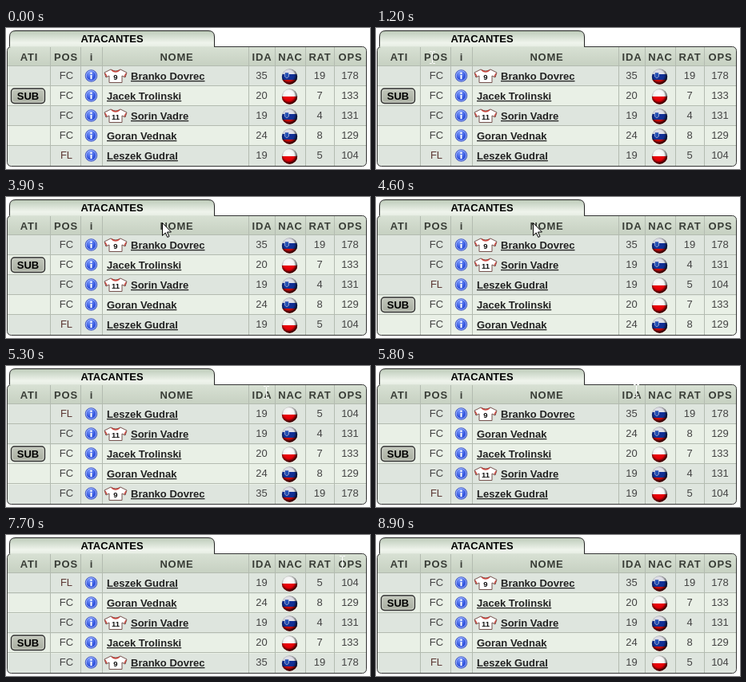
These frames come from a looping animation (455 by 177 pixels, 9900 ms). An HTML page:

```html
<!DOCTYPE html>
<html lang="pt">
<head>
<meta charset="utf-8">
<style>
html, body { margin: 0; width: 100%; height: 100%; overflow: hidden; background: #fff; }
svg { display: block; }
text { font: 13px "Liberation Sans", Arial, sans-serif; fill: #444; text-anchor: middle; }
.head { font-weight: bold; fill: #383c36; letter-spacing: .8px; }
.title { font-weight: bold; fill: #000; }
.name { font-weight: bold; fill: #222; text-anchor: start; text-decoration: underline; }
.small { font-size: 9.5px; font-weight: bold; fill: #111; }
.FL { fill: #5e3a36; }
.line { stroke: #b3bbb0; shape-rendering: crispEdges; }
</style>
</head>
<body>
<svg id="stage" width="455" height="177" viewBox="0 0 455 177">
  <defs>
    <linearGradient id="tab" x2="0" y2="1"><stop stop-color="#bccab8"/><stop offset=".75" stop-color="#eff4ec"/><stop offset="1" stop-color="#e6ede3"/></linearGradient>
    <linearGradient id="bar" x2="0" y2="1"><stop stop-color="#d8e1d4"/><stop offset="1" stop-color="#c6d0c1"/></linearGradient>
    <linearGradient id="button" x2="0" y2="1"><stop stop-color="#c3c8bc"/><stop offset="1" stop-color="#a8ada0"/></linearGradient>
    <radialGradient id="blue" cx=".4" cy=".25"><stop stop-color="#7c9bff"/><stop offset="1" stop-color="#3355dd"/></radialGradient>
    <radialGradient id="gloss" cx=".45" cy=".42" r=".58"><stop stop-color="#000" stop-opacity="0"/><stop offset=".6" stop-color="#000" stop-opacity=".05"/><stop offset="1" stop-color="#000" stop-opacity=".9"/></radialGradient>
    <clipPath id="ball"><circle r="9.7"/></clipPath>
    <clipPath id="panel"><rect x="1.5" y="23.5" width="449" height="150" rx="5"/></clipPath>
    <g id="info"><circle r="7.3" fill="url(#blue)" stroke="#3048b8" stroke-width=".8"/><circle r="6.3" fill="none" stroke="#b9c8ff" stroke-width=".8"/><path d="M0-1V4.2" stroke="#fff" stroke-width="2"/><circle cy="-3.3" r="1.2" fill="#fff"/></g>
    <g id="shirt"><path d="M-6-8 -14-4 -12 2 -8 0V8.5H8V0L12 2 14-4 6-8Q0-4-6-8Z" fill="#fff" stroke="#75524e"/><path d="M-13-3-11 1M13-3 11 1M-5-7Q0-3 5-7" fill="none" stroke="#c9433a" stroke-width="1.4"/></g>
    <g id="slovenia"><g clip-path="url(#ball)"><path d="M-10-10H10V-3H-10Z" fill="#e8e8f0"/><path d="M-10-3H10V4H-10Z" fill="#12319a"/><path d="M-10 4H10V10H-10Z" fill="#d80c10"/><path d="M-6-5H-1V0L-3.5 2 -6 0Z" fill="#2450b8" stroke="#d8d8e8" stroke-width=".6"/></g><circle r="9.7" fill="url(#gloss)"/></g>
    <g id="poland"><g clip-path="url(#ball)"><path d="M-10-10H10V0H-10Z" fill="#fff"/><path d="M-10 0H10V10H-10Z" fill="#f00008"/></g><circle r="9.7" fill="url(#gloss)"/></g>
  </defs>
  <g clip-path="url(#panel)"><g id="rows"></g></g>
  <g id="frame"></g>
  <path id="arrow" d="M.5.5V16.5L4.3 12.9 6.8 18.5 9 17.5 6.5 12H11.5Z" fill="#fff" stroke="#000"/>
  <path id="beam" d="M-3.5-7.5H-1L0-6.5 1-7.5H3.5M0-6.5V6.5M-3.5 7.5H-1L0 6.5 1 7.5H3.5" fill="none" stroke="#fff"/>
</svg>
<script>
const LOOP = 9900;
const $ = id => document.getElementById(id);
const label = (x, y, text, kind = '') => `<text x="${x}" y="${y}" class="${kind}">${text}</text>`;
const use = (id, x, y = 0) => `<use href="#${id}" x="${x}" y="${y}"/>`;

const columns = [['ATI', 29], ['POS', 75], ['i', 107], ['NOME', 213.5], ['IDA', 320], ['NAC', 355.5], ['RAT', 392.5], ['OPS', 430.5]];
const dividers = [55.5, 93.5, 120.5, 303.5, 336.5, 374.5, 410.5];
const players = [
  { name: 'Branko Dovrec', pos: 'FC', shirt: 9, age: 35, flag: 'slovenia', rating: 19, total: 178 },
  { name: 'Jacek Trolinski', pos: 'FC', sub: true, age: 20, flag: 'poland', rating: 7, total: 133 },
  { name: 'Sorin Vadre', pos: 'FC', shirt: 11, age: 19, flag: 'slovenia', rating: 4, total: 131 },
  { name: 'Goran Vednak', pos: 'FC', age: 24, flag: 'slovenia', rating: 8, total: 129 },
  { name: 'Leszek Gudral', pos: 'FL', age: 19, flag: 'poland', rating: 5, total: 104 }
];

// Player indices from the top row down, after each click on a header.
const orders = [
  [0, '01234'], [2400, '40123'], [3000, '01234'], [4000, '31420'], [4600, '02413'],
  [5200, '42130'], [5800, '03124'], [6400, '24130'], [7000, '03142'], [7700, '43210'], [8300, '01234']
];

// Pointer positions: time, x, y, shape.
const pointer = [
  [0, 0, 0, ''],
  [800, 20, 0, 'arrow'], [900, 60, 12, 'arrow'], [1000, 110, 22, 'arrow'], [1100, 132, 31, 'arrow'],
  [1200, 70.5, 37, 'beam'], [1400, 70.5, 36, 'beam'],
  [3100, 100, 8, 'arrow'], [3200, 145, 33, 'arrow'], [3400, 172, 34, 'arrow'], [3500, 183, 33, 'arrow'],
  [3600, 189, 33, 'arrow'], [3700, 192, 33, 'arrow'], [3800, 194, 32, 'arrow'], [3900, 195, 32, 'arrow'],
  [4300, 196, 32, 'arrow'], [4700, 200, 30, 'arrow'], [4800, 215, 29, 'arrow'],
  [5000, 322, 30, 'arrow'], [5200, 325.5, 33, 'beam'], [5500, 325.5, 31, 'beam'],
  [5900, 360, 31, 'beam'], [6000, 393.5, 32, 'beam'], [6200, 393.5, 31, 'beam'],
  [7200, 415.5, 33, 'beam'], [7300, 426.5, 34, 'beam'], [7500, 424.5, 34, 'beam'], [7600, 420.5, 34, 'beam'],
  [8400, 413, 35, 'arrow'], [8600, 300, 50, 'arrow'], [8700, 150, 64, 'arrow'], [8800, 19, 10, 'arrow'], [8900, 0, 0, '']
];

function drawFrame() {
  let out = '<path d="M4.5 23.5V11Q4.5 3.5 12 3.5H253Q260.5 3.5 260.5 11V23.5" fill="url(#tab)" stroke="#222"/>';
  out += label(132.5, 18, 'ATACANTES', 'title');
  out += '<g clip-path="url(#panel)"><rect x="1" y="23" width="450" height="25" fill="url(#bar)"/>';
  for (let i = 0; i < 5; i++) out += `<path class="line" d="M2 ${47.5 + 25 * i}H450"/>`;
  for (const x of dividers) out += `<path class="line" d="M${x} 24V173"/>`;
  out += '</g><rect x="1.5" y="23.5" width="449" height="150" rx="5" fill="none" stroke="#333"/>';
  out += '<path d="M5 23.5H260" stroke="#dce4d8"/>';
  for (const [text, x] of columns) out += label(x, 41, text, 'head');
  $('frame').innerHTML = out;
}

// Each row keeps its own stripe colour when the table is sorted.
function drawRow(p, i) {
  let out = `<rect x="1" y="-12" width="450" height="26" fill="${i % 2 ? '#e9f0e6' : '#dee5de'}"/>`;
  out += label(75.5, 4, p.pos, p.pos) + use('info', 106.5) + use(p.flag, 354.5, 1);
  if (p.sub) {
    out += '<rect x="6.5" y="-9" width="42" height="18.5" rx="4" fill="url(#button)" stroke="#333" stroke-width="1.4"/>';
    out += '<rect x="8" y="-7.5" width="39" height="15.5" rx="3" fill="none" stroke="#d5d9d0" stroke-width=".8"/>';
    out += label(27.5, 5, 'SUB', 'title');
  }
  if (p.shirt) out += use('shirt', 137) + label(137, 5, p.shirt, 'small');
  out += label(p.shirt ? 156 : 126, 5, p.name, 'name');
  out += label(319.5, 4, p.age) + label(392, 4, p.rating) + label(430, 4, p.total);
  return `<g>${out}</g>`;
}

const at = (list, t) => list.findLast(step => step[0] <= t);

function render(now) {
  const t = now % LOOP;
  [...at(orders, t)[1]].forEach((player, i) =>
    $('rows').children[player].setAttribute('transform', `translate(0 ${60 + 25 * i})`));
  const [, x, y, shape] = at(pointer, t);
  for (const id of ['arrow', 'beam']) {
    $(id).setAttribute('transform', `translate(${x} ${y})`);
    $(id).setAttribute('visibility', id === shape ? 'visible' : 'hidden');
  }
}

drawFrame();
$('rows').innerHTML = players.map(drawRow).join('');
const start = performance.now();
function tick() {
  render(performance.now() - start);
  requestAnimationFrame(tick);
}
tick();
</script>
</body>
</html>
```
